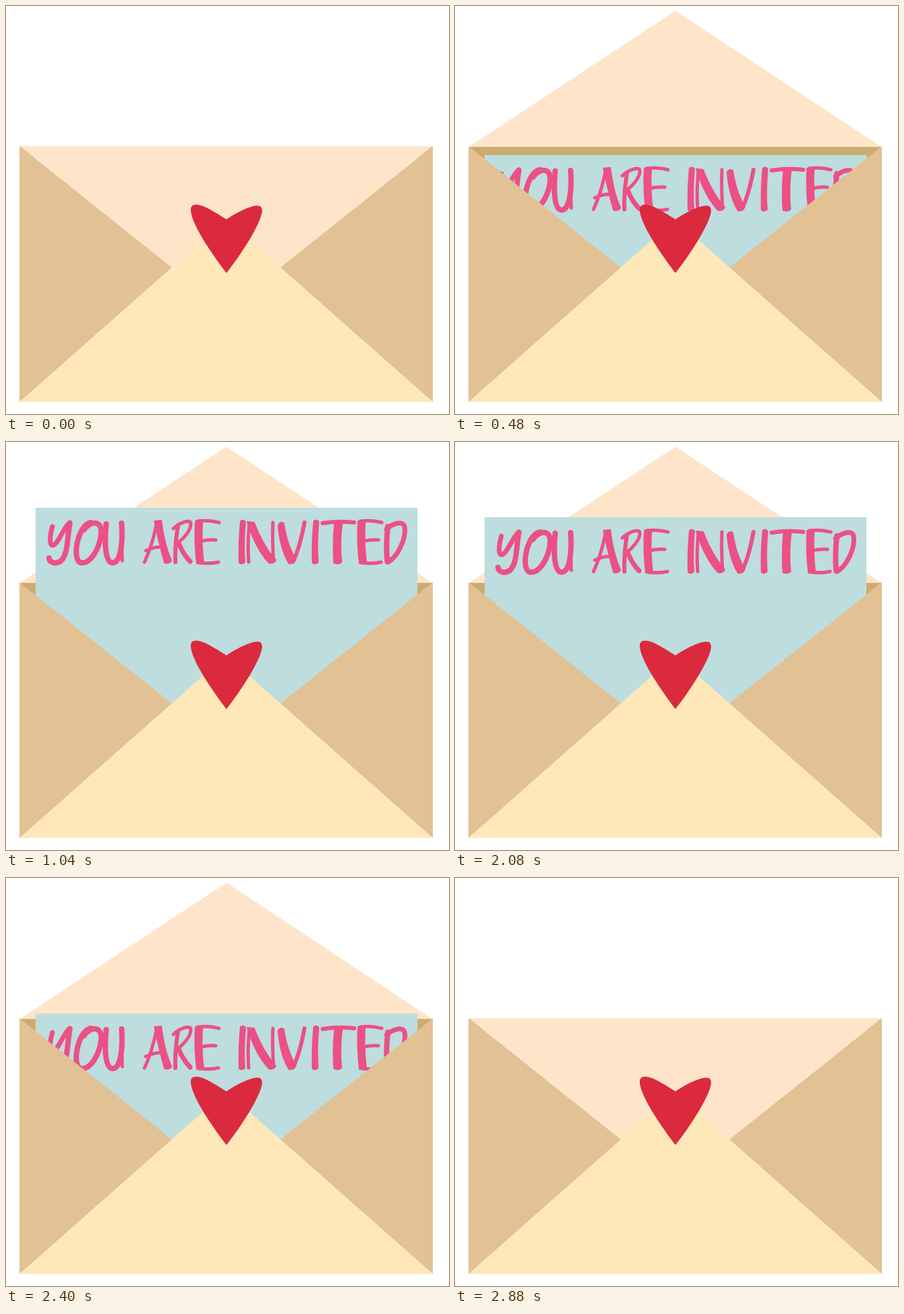
These frames come from a looping animation (659 px wide and 608 px high, 3.84 s). An HTML page:

```html
<!DOCTYPE html>
<html lang="en">
<head>
<meta charset="utf-8">
<title>Invitation</title>
<style>
html, body { margin: 0; width: 100%; height: 100%; overflow: hidden; background: #fff; }
svg { display: block; width: 100%; height: 100%; }
.ink { fill: none; stroke: #ec5085; stroke-linecap: round; stroke-linejoin: round; }
.wedge { fill: #ec5085; stroke-width: 2; }
</style>
</head>
<body>
<svg viewBox="0 0 659 608" role="img" aria-label="You are invited">
  <defs>
    <g id="e">
      <path class="wedge" d="M1 2L11 3Q9 34 13 65L3 65Q-1 34 1 2Z"/>
      <path stroke-width="5" d="M4 2Q22 0 36 4M8 32Q20 29 31 30M6 64Q22 66 35 63"/>
    </g>
    <path id="i" class="wedge" d="M2 2Q6 -1 9 3Q6 34 8 63Q4 67 0 64Q-1 34 2 2Z"/>
  </defs>
  <path fill="#cdab6f" d="M20 210H635V420H20Z"/>
  <path id="back" fill="#fee5ca"/>
  <g id="card">
    <path fill="#bddddf" d="M44 0H612V300H44Z"/>
    <g class="ink" transform="translate(0 18)">
      <!-- YOU -->
      <path stroke-width="7" d="M69 10C65 24 64 38 70 38C78 36 86 10 95 4"/>
      <path stroke-width="8" d="M95 5C91 24 93 50 82 61C74 67 65 64 64 57"/>
      <path stroke-width="8" d="M126 4C106 8 97 62 112 64C133 66 149 16 138 7C132 2 122 6 116 15"/>
      <path stroke-width="8" d="M149 6C147 28 146 62 158 64C171 64 174 34 172 5"/>
      <path stroke-width="5" d="M173 5Q172 42 173 61"/>
      <!-- ARE -->
      <path stroke-width="5" d="M206 63Q217 40 224 6M208 46Q222 39 236 41"/>
      <path class="wedge" d="M221 2L231 1Q235 36 246 61Q242 66 236 64Q228 36 221 2Z"/>
      <path stroke-width="6" d="M252 63Q251 36 256 8"/>
      <path stroke-width="5" d="M249 13C258 4 275 -2 275 6C275 16 264 28 256 34"/>
      <path stroke-width="7" d="M257 35Q264 52 274 62"/>
      <use href="#e" x="281"/>
      <!-- INVITED -->
      <use href="#i" x="347"/>
      <path stroke-width="5" d="M362 6Q359 36 361 63M397 4Q396 34 398 61"/>
      <path class="wedge" d="M359 3L369 4Q382 38 401 60Q398 66 391 64Q372 44 359 3Z"/>
      <path class="wedge" d="M405 8Q408 2 413 5Q418 38 431 59Q428 66 421 65Q408 44 405 8Z"/>
      <path stroke-width="6" d="M427 62Q437 42 444 4"/>
      <use href="#i" x="456"/>
      <path stroke-width="6" d="M471 5Q496 1 518 4"/>
      <path class="wedge" d="M489 4L500 4Q496 34 499 63Q494 67 488 64Q486 34 489 4Z"/>
      <use href="#e" x="523"/>
      <path stroke-width="8" d="M568 10Q565 36 567 62"/>
      <path stroke-width="7" d="M566 14C574 6 590 0 593 10C596 28 582 56 568 63"/>
    </g>
  </g>
  <path id="front" fill="#fee5ca"/>
  <path fill="#e2c194" d="M20 209L246.5 389.5L260 400L20 590ZM635 209L408.500 389.500L395 400L635 590Z"/>
  <path fill="#fee8b9" d="M20 590L327.500 318L635 590Z"/>
  <path fill="#db2a3d" d="M328 318C312 308 294 296 283 296C277 296 274 299 275 306C277 327 308 372 328 398C350 370 379 325 381 306C381 300 379 297 373 297.500C362 298 341 309 328 318Z"/>
</svg>
<script>
const LOOP = 3840, STEP = 80;
const SHUT = 456, OPEN = 7, LOW = 222, HIGH = 98, HINGE = 209;
const $ = id => document.getElementById(id);
const back = $('back'), front = $('front'), card = $('card');

const ramp = (t, a, b) => Math.min(1, Math.max(0, (t - a) / (b - a)));
const mix = (a, b, p) => a + (b - a) * p;

function draw(t) {
  const lift = ramp(t, 25, 480) - ramp(t, 2400, 2855);
  const rise = ramp(t, 542, 1002) - ramp(t, 2030, 2471);
  const tip = mix(SHUT, OPEN, lift);
  const isUp = tip < HINGE;
  const base = isUp ? HINGE + 1 : HINGE;
  const flap = `M20.5 ${base}H634.5L328 ${tip}Z`;
  back.setAttribute('d', isUp ? flap : '');
  front.setAttribute('d', isUp ? '' : flap);
  card.setAttribute('transform', `translate(0 ${mix(LOW, HIGH, rise)})`);
}

const start = performance.now();
function tick() {
  const t = (performance.now() - start) % LOOP;
  draw(Math.floor(t / STEP) * STEP);
  requestAnimationFrame(tick);
}
tick();
</script>
</body>
</html>
```
